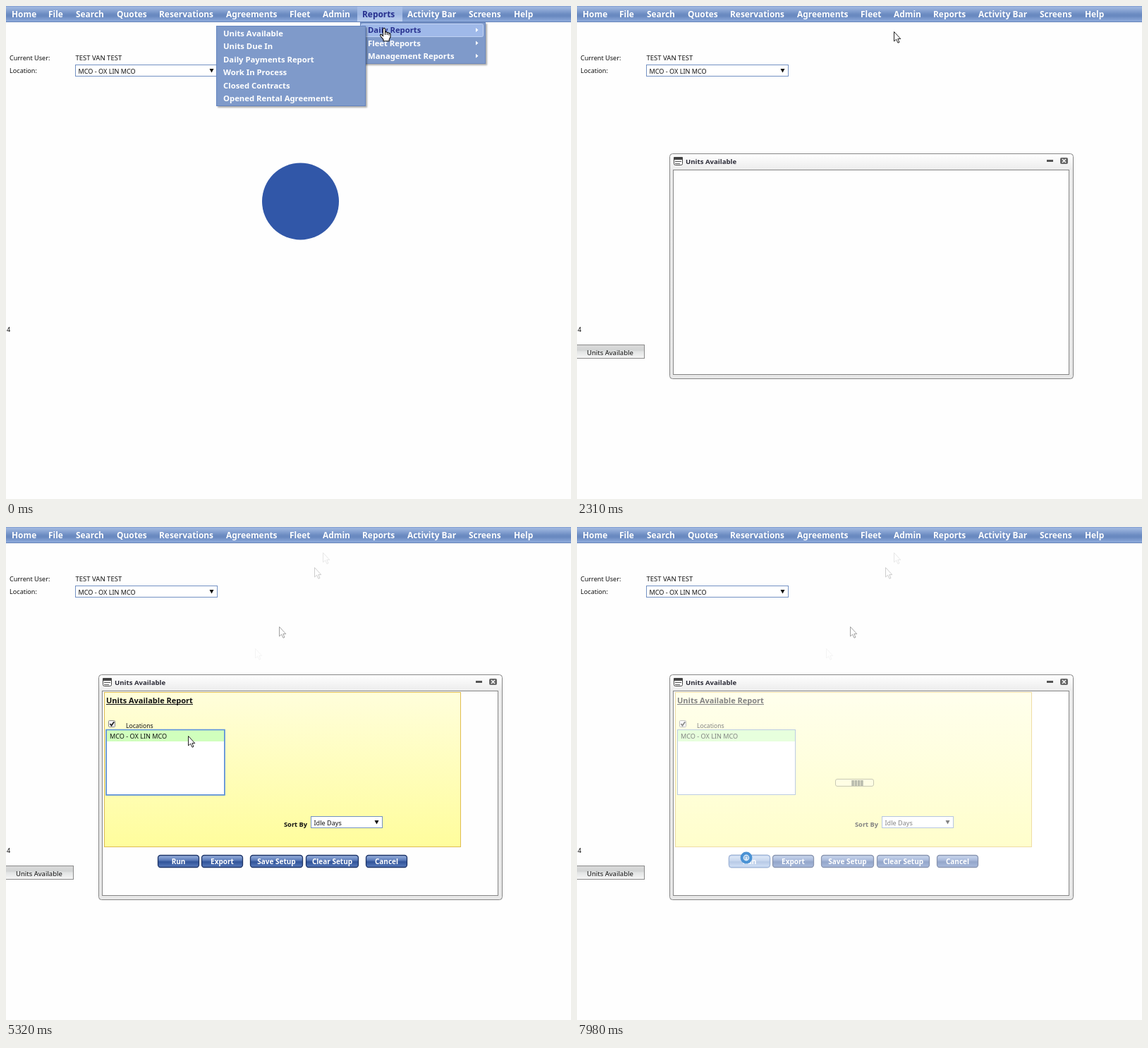
An HTML page for the animation above (8 s loop, 801 by 699 pixels).

```html
<!DOCTYPE html>
<html lang="en">
<head>
<meta charset="utf-8">
<title>Units Available</title>
<style>
html, body { margin: 0; width: 100%; height: 100%; overflow: hidden; background: #fefefe; }
svg { display: block; width: 801px; height: 699px; }
text { font: 9.1px "Noto Sans", "Open Sans", sans-serif; fill: #111; white-space: pre; }
.b { font-weight: bold; }
.menu { font-size: 11.9px; fill: #fff; }
.item { font-size: 11.3px; fill: #fff; }
.on { fill: #28318f; }
.btn { font-size: 10px; fill: #fff; text-anchor: middle; }
.panel { filter: drop-shadow(2px 2px 1px #0005); }
</style>
</head>
<body>
<svg id="stage" viewBox="0 0 801 699"></svg>
<script>
const rect = (x, y, w, h, fill, stroke = 'none', rx = 0, more = '') =>
  `<rect x="${x}" y="${y}" width="${w}" height="${h}" rx="${rx}" fill="${fill}" stroke="${stroke}" ${more}/>`;
const text = (x, y, s, cls = '', more = '') => `<text x="${x}" y="${y}" class="${cls}" ${more}>${s}</text>`;
const path = (d, fill = 'none', stroke = 'none', w = 1) =>
  `<path d="${d}" fill="${fill}" stroke="${stroke}" stroke-width="${w}"/>`;
const group = (id, body) => `<g id="${id}">${body}</g>`;
const gradient = (id, ...stops) => `<linearGradient id="${id}Fill" x2="0" y2="1">` +
  stops.map(([o, c]) => `<stop offset="${o}" stop-color="${c}"/>`).join('') + '</linearGradient>';
const select = (x, y, w, h, s) => rect(x, y, w, h, '#fff', '#7391c3') + text(x + 4, y + h - 4, s) +
  path(`M${x + w - 11} ${y + 5.5}h6l-3 5.5z`, '#111');

const place = 'MCO - OX LIN MCO';
const defs = '<defs>' +
  gradient('bar', [0, '#7f9ccf'], [.08, '#a0b8e0'], [.5, '#6c8cc2'], [.62, '#6888bf'], [1, '#94b0e0']) +
  gradient('tab', [0, '#a9bfe6'], [.5, '#9db6e2'], [1, '#bfd1f1']) +
  gradient('task', [0, '#dadada'], [.4, '#d2d4d4'], [.5, '#e2e4e4'], [1, '#f6f6f6']) +
  gradient('frame', [0, '#fff'], [.07, '#ececec'], [1, '#e8e8e8']) +
  gradient('form', [0, '#fffedb'], [1, '#fffd9c']) +
  gradient('blue', [0, '#9cb4df'], [.4, '#5d7dbb'], [.55, '#31549a'], [1, '#5a7cbd']) +
  gradient('hover', [0, '#c3d6f3'], [.45, '#97b3de'], [.55, '#7598cf'], [1, '#a9c5ee']) + '</defs>';

const menu = [['Home', 8], ['File', 60], ['Search', 99], ['Quotes', 157], ['Reservations', 217],
  ['Agreements', 312], ['Fleet', 402], ['Admin', 449], ['Reports', 505], ['Activity Bar', 569],
  ['Screens', 656], ['Help', 720]];
const reports = ['Daily Reports', 'Fleet Reports', 'Management Reports'];
const daily = ['Units Available', 'Units Due In', 'Daily Payments Report', 'Work In Process',
  'Closed Contracts', 'Opened Rental Agreements'];

const page =
  rect(0, 0, 801, 23, 'url(#barFill)') + rect(0, 22, 801, 1, '#6482b8') +
  menu.map(([s, x]) => text(x, 16, s, 'menu b')).join('') +
  text(5, 77, 'Current User:') + text(98.5, 77, 'TEST VAN TEST', '', 'style="font-size:9.5px"') +
  text(5, 95, 'Location:') + select(98.5, 83.5, 201, 16, place) +
  text(1, 462, '4') + '<circle cx="417.5" cy="277" r="54.5" fill="#3157a8"/>';

const menus = group('menus',
  rect(498, 1, 64, 21, 'url(#tabFill)') + text(505, 16, 'Reports', 'menu b on') +
  rect(502.5, 23.5, 177, 58, '#7f9aca', '#6c89bf', 0, 'class="panel"') +
  rect(503.5, 25.5, 173, 18, '#9fb9e9', '#c0d2f3', 2) +
  reports.map((s, i) => text(513, 38 + i * 18.5, s, 'item b' + (i ? '' : ' on')) +
    path(`M666 ${31 + i * 18.4}l3.5 3-3.5 3z`, '#fff')).join('') +
  rect(298.5, 28.5, 211, 113, '#7f9aca', '#6484bf', 0, 'class="panel"') +
  group('hot', rect(300.5, 30.5, 207, 18, '#9fb9e9', '#c0d2f3', 2)) +
  daily.map((s, i) => text(308, 43 + i * 18.4, s, 'item b')).join('') +
  group('hotText', text(308, 43, daily[0], 'item b on')));

const win = rect(-1.5, 480.5, 97, 19, 'url(#taskFill)', '#8a8a8a') +
  text(14, 495, daily[0], '', 'style="font-size:9.5px"') +
  rect(131.5, 209.5, 572, 319, 'url(#frameFill)', '#858585', 4) +
  rect(137.5, 214.5, 12, 11, '#fff', '#444', 2) + rect(137, 214, 13, 4, '#444', 'none', 1) +
  path('M139 220.5h9M139 223.5h7', 'none', '#555') +
  text(154, 224, daily[0], 'b', 'style="font-size:9.6px;fill:#2a2a36"') +
  rect(666, 218, 9, 3, '#555') + rect(685, 215, 11, 9, '#666', 'none', 2) +
  path('M688 217l5 5m0-5l-5 5', 'none', '#fff', 1.3) +
  rect(136.5, 232.5, 561, 290, '#fefefe', '#858585');

const buttons = [['Run', 215, 59], ['Export', 277, 59], ['Save Setup', 346, 75],
  ['Clear Setup', 425, 75], ['Cancel', 510, 59]];
const button = ([s, x, w], fill, edge) =>
  rect(x + .5, 465.5, w - 1, 17, fill, edge, 3.5, 'stroke-width="1.3"') + text(x + w / 2, 478, s, 'btn b');
const form = group('form',
  rect(139.5, 234.5, 505, 219, 'url(#formFill)', '#dfbd52') +
  text(142, 250, 'Units Available Report', 'b', 'style="font-size:11px"') + rect(142, 251, 123, 1, '#111') +
  rect(145.5, 274.5, 9, 9, '#f5f5f5', '#888', 1) + path('M147.5 279l2 2.5 3.7-5.3', 'none', '#222', 1.8) +
  text(170, 285, 'Locations', '', 'style="font-size:8.6px"') +
  rect(142.5, 287.5, 167, 92, '#fff', '#7f9cc8') + rect(143, 288, 166, 16, '#d0ffbd') +
  text(147, 300, place) +
  group('focus', rect(142, 287.5, 168, 92.5, 'none', '#5b92dc', 0, 'stroke-width="1.6"')) +
  text(394, 425, 'Sort By', 'b', 'style="font-size:9.3px"') + select(432.5, 410.5, 101, 16, 'Idle Days') +
  buttons.map(b => button(b, 'url(#blueFill)', '#1d3467')).join('') +
  group('runHot', button(buttons[0], 'url(#hoverFill)', '#4f78bb')));

const veil = group('veil', rect(137, 233, 560, 289, '#fefefe')) +
  group('loader', rect(366.5, 357.5, 54, 10, '#fffee4', '#c9c9b4', 2.5) +
    group('blocks', [0, 1, 2, 3].map(i => rect(i * 4.3, 359, 3.6, 8, '#b9bcae')).join('')));

const arrow = path('M.5 .5V14L3.6 11.2 6 16.3 8 15.3 5.8 10.6H9.8Z', '#fff', '#222');
const hand = path('M-1.5 1.5Q0-.8 1.5 1.5V6Q3.3 5 4.3 6.8 6 6 6.8 7.6 9 7 9 9.5V13L7.2 16.5V18.8H-1V16.5' +
  'L-5 11.8Q-6.3 9-4 9.4L-1.5 11.5ZM1.5 6V10M4.3 7V10M6.8 8V10.5', '#fff', '#111', 1.1);
const busy = '<circle r="6.4" fill="#d8e8f7" stroke="#4a92d4" stroke-width="4"/>' +
  path('M-2 2V-2H2V2', 'none', '#6d9fd2');

// Faint cursor marks left behind on the page: time, x, y, opacity
const marks = [[3220, 449, 36, .1], [3290, 437, 57, .22], [3430, 387, 141, .42], [3500, 353, 172, .04]];
const trail = marks.map(([, x, y, o], i) =>
  group('mark' + i, `<g transform="translate(${x} ${y})" opacity="${o}">${arrow}</g>`)).join('');

document.getElementById('stage').innerHTML = defs + page + trail + menus + group('win', win + form + veil) +
  group('cursor', group('arrow', arrow) + group('hand', hand) + group('busy', busy));

const $ = id => document.getElementById(id);
const show = (id, on) => $(id).setAttribute('display', on ? 'inline' : 'none');
const move = (id, x, y) => $(id).setAttribute('transform', `translate(${x} ${y})`);

// Cursor hotspot: time, x, y
const route = [[0, 536, 31], [490, 536, 31], [630, 524, 32], [910, 458, 36], [1050, 449, 36],
  [3080, 449, 36], [3150, 446, 41], [3220, 437, 57], [3360, 387, 141], [3430, 353, 172],
  [3500, 322, 202], [3640, 292, 237], [3920, 274, 262], [4200, 264, 283], [4550, 258, 296],
  [5320, 258, 296], [5600, 251, 362], [5880, 243, 449], [6090, 242, 466],
  [6300, 241, 469], [8000, 241, 469]];

function cursorAt(t) {
  const i = route.findIndex(k => k[0] > t);
  const [t0, x0, y0] = route[i - 1], [t1, x1, y1] = route[i];
  const p = (t - t0) / (t1 - t0);
  return [Math.round(x0 + (x1 - x0) * p), Math.round(y0 + (y1 - y0) * p)];
}

function draw(now) {
  const t = Math.floor(now % 8000 / 70) * 70;
  const [x, y] = cursorAt(t);
  const overRun = y >= 465, waiting = t >= 7280, pointing = !waiting && (t < 1750 || overRun);

  show('menus', t < 2100);
  show('hot', x < 509);
  show('hotText', x < 509);
  show('win', t >= 2100);
  show('form', t >= 2450);
  show('focus', t >= 4550 && t < 7210);
  show('runHot', overRun);
  marks.forEach(([start], i) => show('mark' + i, t >= start));

  $('veil').setAttribute('opacity', Math.min(.48, Math.max(0, (t - 7210) / 580)));
  show('loader', waiting);
  const step = t < 7630 ? 0 : t < 7980 ? Math.min(4, (t - 7560) / 70) : 5;
  move('blocks', 368 + step * 4.25, 0);

  show('arrow', !pointing && !waiting);
  show('hand', pointing);
  show('busy', waiting);
  move('cursor', waiting ? 240 : x, y);
  requestAnimationFrame(draw);
}
requestAnimationFrame(draw);
</script>
</body>
</html>
```
